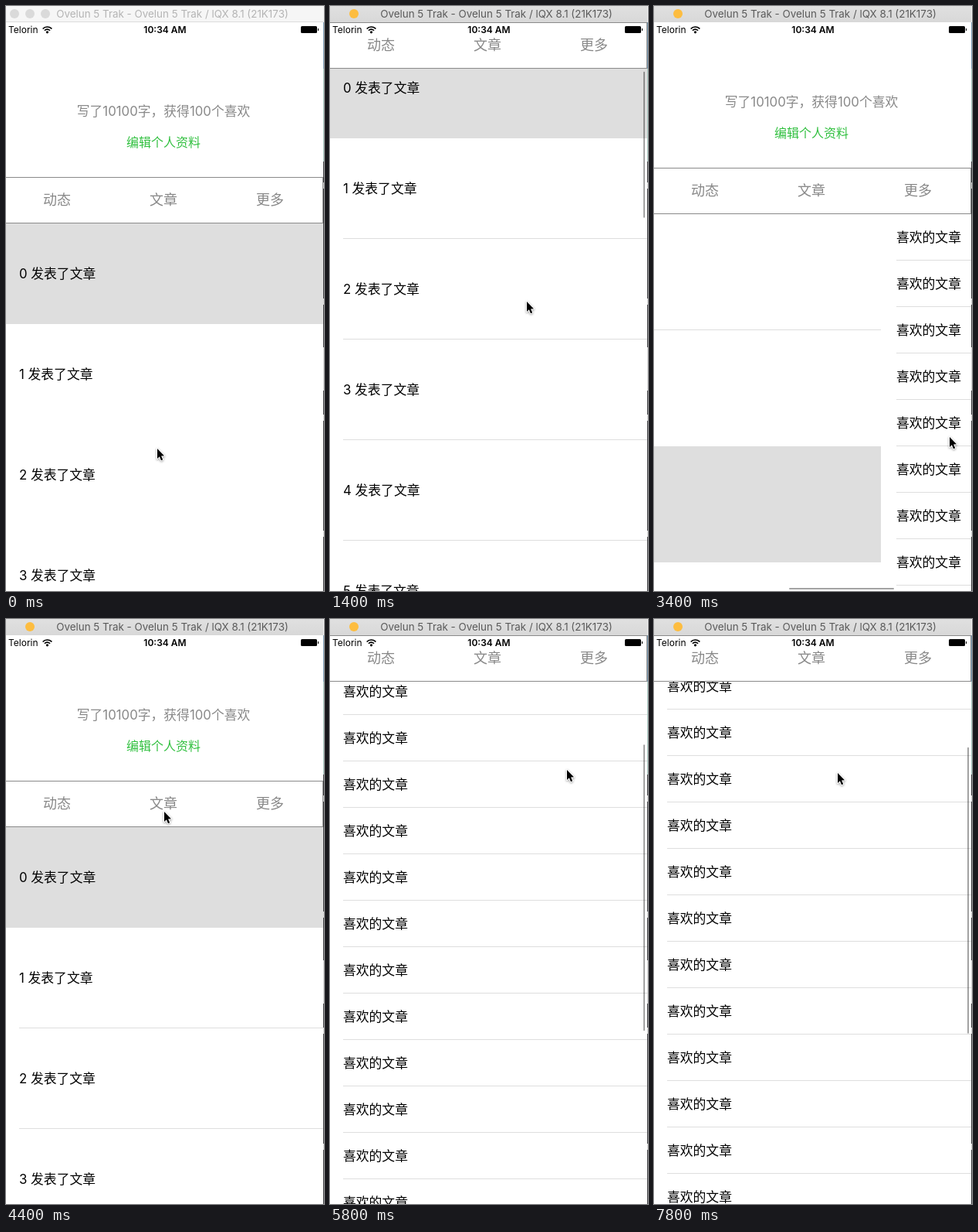
An HTML page with a canvas for the animation above (8000 ms loop, 412 px wide and 756 px high).

```html
<!DOCTYPE html>
<html lang="zh-Hans">
<head>
<meta charset="utf-8">
<title>Profile tabs</title>
<style>
  html, body { margin: 0; width: 100%; height: 100%; overflow: hidden; background: #fff; }
  canvas { display: block; width: 412px; height: 756px; }
</style>
</head>
<body>
<canvas id="stage" width="412" height="756"></canvas>
<script>
const ctx = document.getElementById('stage').getContext('2d');
const W = 412, H = 756, LOOP = 8000, STEP = 200;
const LEFT = -3, PAGE_W = 414, EDGE = 411;
const VIEW = 736, ROWS = 20, REST = 12;
const FONT = '"Inter", "Noto Sans CJK SC", "Noto Sans CJK", sans-serif';
const GREY = '#888', LINE = '#dedede', PICKED = '#dedede';

const pages = [
  { height: 130, picked: 0, label: i => i + ' 发表了文章' },
  { height: 150, picked: 2, label: i => '关于' + i + '的文章' },
  { height: 60, picked: -1, label: () => '喜欢的文章' }
];

// Each gesture eases the named values towards new ones.
const initial = { scroll: 0, page: 0, x: 196, y: 572 };
const gestures = [
  { at: 200, span: 800, scroll: 467, x: 180, y: 201 },
  { at: 1200, span: 400, scroll: REST, x: 330, y: 562 },
  { at: 1600, span: 430, page: 1, x: 288 },
  { at: 2400, span: 400, page: 2, x: 86, y: 557 },
  { at: 3000, span: 400, page: 1.283, x: 383 },
  { at: 3400, span: 600, page: 0 },
  { at: 3800, span: 400, x: 205, y: 249 },
  { at: 4400, span: 200, page: 1, x: 335 },
  { at: 4800, span: 200, page: 2, y: 470 },
  { at: 5200, span: 600, scroll: 277, x: 307, y: 195 },
  { at: 6000, span: 600, scroll: REST, x: 240, y: 470 },
  { at: 7000, span: 800, scroll: 284, x: 238, y: 199 }
];

function ease(u) {
  const k = Math.min(1, Math.max(0, u));
  return k * k * (3 - 2 * k);
}

const valueAt = (key, t) => gestures.reduce(
  (v, g) => key in g ? v + (g[key] - v) * ease((t - g.at) / g.span) : v,
  initial[key]);

const moving = (key, t) => Math.abs(valueAt(key, t) - valueAt(key, t - STEP)) > 0.002;

function rect(x, y, w, h, color) {
  ctx.fillStyle = color;
  ctx.fillRect(x, y, w, h);
}

function pill(x, y, w, h, r, color) {
  ctx.fillStyle = color;
  ctx.beginPath();
  ctx.roundRect(x, y, w, h, r);
  ctx.fill();
}

const dot = (x, y, r, color) => pill(x - r, y - r, 2 * r, 2 * r, r, color);
const bar = (x, y, w, h) => pill(x, y, w, h, 1, 'rgba(0,0,0,0.36)');

function text(str, x, middle, size, color, align = 'left', weight = 400) {
  ctx.font = `${weight} ${size}px ${FONT}`;
  ctx.textAlign = align;
  ctx.fillStyle = color;
  ctx.fillText(str, x, Math.round(middle + size * 0.36));
}

function drawPage(page, x, scroll, ruled) {
  if (x >= EDGE || x + PAGE_W <= 0) return;
  const { height, picked, label } = page;
  ctx.save();
  ctx.beginPath();
  ctx.rect(x, 0, PAGE_W, H);
  ctx.clip();
  for (let i = 0; i < ROWS; i++) {
    const top = 281 - scroll + i * height;
    if (i === picked) rect(x, top, PAGE_W, height, PICKED);
    else if (ruled && i + 1 !== picked) rect(x + 20, top + height - 1, PAGE_W, 1, LINE);
    text(label(i), x + 20, top + height / 2, 16.8, '#000');
  }
  ctx.restore();
}

function drawHeader(scroll) {
  const dy = -Math.min(scroll, 200);
  rect(0, 21, EDGE, 260 + dy, '#fff');
  if (dy > -200) {
    text('写了10100字，获得100个喜欢', 204, 136 + dy, 16.8, GREY, 'center');
    text('编辑个人资料', 204, 176 + dy, 16, '#32c040', 'center', 500);
  }
  ctx.strokeStyle = '#8a8a8a';
  ctx.lineWidth = 1;
  ctx.strokeRect(LEFT - 0.5, 221.5 + dy, PAGE_W, 59);
  ['动态', '文章', '更多'].forEach((name, i) =>
    text(name, 66 + 138 * i, 251 + dy, 18, GREY, 'center'));
}

function drawStatus() {
  text('Telorin', 3, 31, 12, '#000');
  ctx.strokeStyle = '#000';
  ctx.lineWidth = 1.7;
  for (const r of [4.8, 8]) {
    ctx.beginPath();
    ctx.arc(53.5, 35, r, -Math.PI * 0.76, -Math.PI * 0.24);
    ctx.stroke();
  }
  dot(53.5, 33.8, 1.6, '#000');
  text('10:34 AM', 206, 31, 12, '#000', 'center', 600);
  pill(382, 26, 21, 9, 1.5, '#000');
  rect(404, 29, 1, 3, '#000');
}

function drawTitleBar(active) {
  if (active) {
    const shade = ctx.createLinearGradient(0, 0, 0, 21);
    shade.addColorStop(0, '#e0e0e0');
    shade.addColorStop(1, '#d8d8d8');
    rect(0, 0, EDGE, 21, shade);
    dot(31, 10, 6, '#fdbd40');
  } else {
    rect(0, 0, EDGE, 21, '#f6f6f6');
    rect(0, 20, EDGE, 1, '#dcdcdc');
    for (let i = 0; i < 3; i++) dot(11 + 20 * i, 10, 6, '#dadada');
  }
  text('Ovelun 5 Trak - Ovelun 5 Trak / lQX 8.1 (21K173)', 215.5, 10.5, 13.4,
    active ? '#5a5a5a' : '#b4b4b4', 'center');
}

// Sliver of desktop beside the window.
function drawDesktop() {
  rect(EDGE, 0, 1, 21, '#f2f2f2');
  rect(EDGE, 21, 1, 60, '#7f9fb8');
  rect(EDGE, 81, 1, 120, '#a9c9c2');
  rect(EDGE, 201, 1, H, '#3c3c40');
  for (let y = 228; y < H; y += 150) rect(EDGE, y, 1, 8, '#d8d8d8');
  rect(EDGE, 441, 1, 56, '#d8d8d8');
}

function drawPointer(x, y) {
  ctx.save();
  ctx.translate(x, y);
  ctx.beginPath();
  [[0, 0], [0, 13], [2.9, 10.3], [5, 15.2], [7.2, 14.2], [5.1, 9.5], [9, 9.3]]
    .forEach(([px, py]) => ctx.lineTo(px, py));
  ctx.closePath();
  ctx.shadowColor = 'rgba(0,0,0,0.4)';
  ctx.shadowBlur = 3;
  ctx.shadowOffsetY = 1;
  ctx.lineWidth = 2;
  ctx.lineJoin = 'round';
  ctx.strokeStyle = '#fff';
  ctx.stroke();
  ctx.shadowColor = 'transparent';
  ctx.fillStyle = '#000';
  ctx.fill();
  ctx.restore();
}

function drawBars(t, scroll, offset) {
  if (moving('scroll', t)) {
    const index = Math.round(offset / PAGE_W);
    const ratio = VIEW / (pages[index].height * ROWS + 264);
    const x = LEFT + 409 + index * PAGE_W - offset;
    bar(x, 23 + scroll * ratio, 2, VIEW * ratio);
  }
  if (moving('page', t)) bar(offset / 3 - 2, 752, 136, 2);
}

function draw(t) {
  const scroll = Math.round(valueAt('scroll', t));
  const offset = Math.round(valueAt('page', t) * PAGE_W);
  const active = t >= STEP;
  rect(0, 0, W, H, '#fff');
  ctx.save();
  ctx.beginPath();
  ctx.rect(0, 0, EDGE, H);
  ctx.clip();
  pages.forEach((page, i) =>
    drawPage(page, LEFT + i * PAGE_W - offset, scroll, active));
  drawHeader(scroll);
  drawBars(t, scroll, offset);
  drawStatus();
  drawTitleBar(active);
  ctx.restore();
  drawDesktop();
  drawPointer(Math.round(valueAt('x', t)), Math.round(valueAt('y', t)));
}

const start = performance.now();
function tick() {
  const t = (performance.now() - start) % LOOP;
  draw(Math.floor(t / STEP) * STEP);
  requestAnimationFrame(tick);
}
tick();
</script>
</body>
</html>
```
